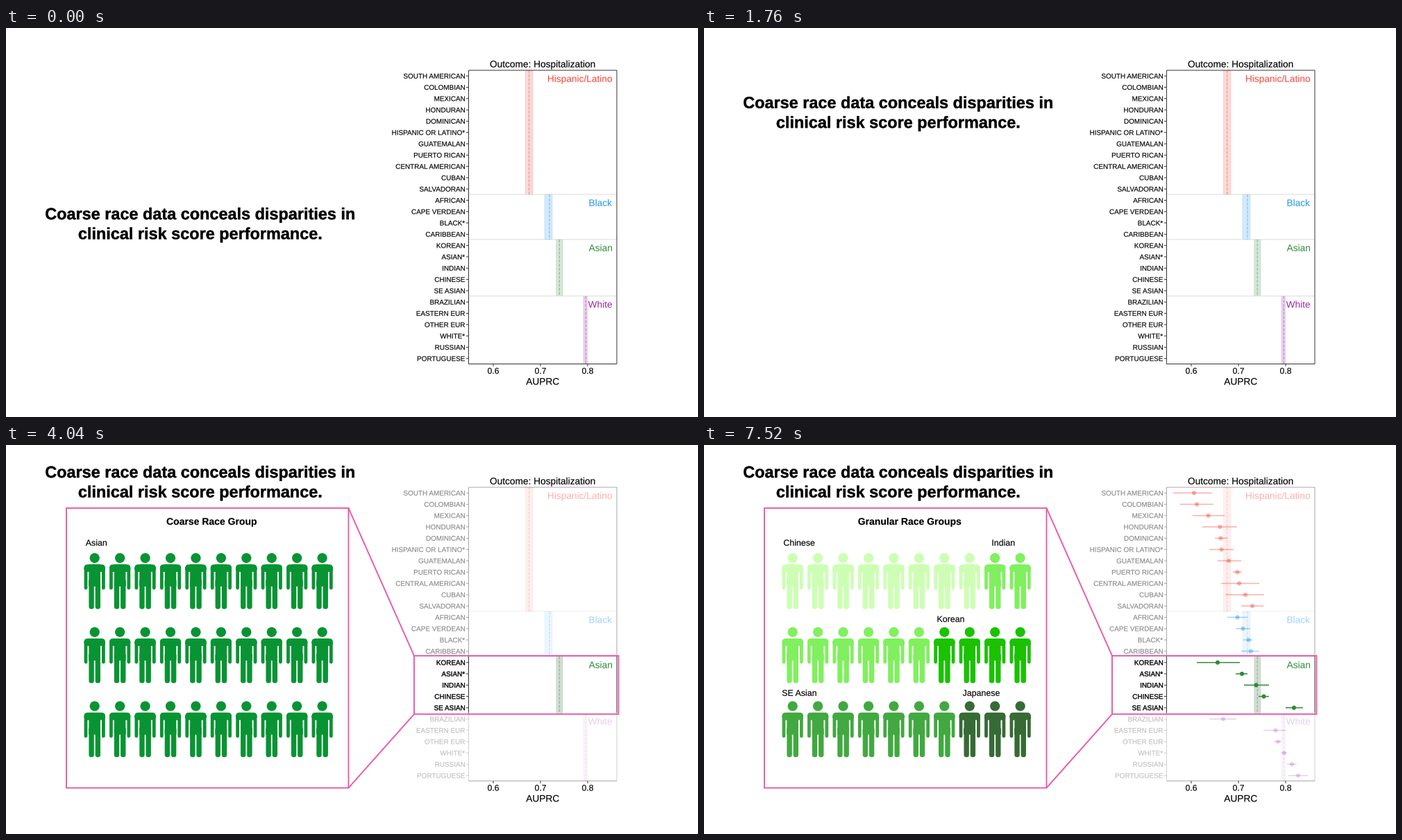
Write a matplotlib script that moves like this. It is 997x561 px and loops after 8 s.

```python
import numpy as np
import matplotlib.pyplot as plt
from matplotlib.animation import FuncAnimation
from matplotlib.colors import to_rgb
from matplotlib.patches import PathPatch
from matplotlib.path import Path
from matplotlib.textpath import TextPath
from matplotlib.transforms import Affine2D

W, H, DPI = 997, 561, 100
STEP, LOOP = 40, 8000
PX = 72 / DPI

PINK = "#ec58a5"
COARSE = np.array(to_rgb("#089433"))
LEFT, RIGHT, TOP, BOTTOM = 666.5, 880, 61, 484.5
ROW0, ROW_STEP = 69.2, 16.3

fig = plt.figure(figsize=((W + 0.01) / DPI, (H + 0.01) / DPI), dpi=DPI, facecolor="white")
ax = fig.add_axes([0, 0, 1, 1])
ax.set_xlim(0, W)
ax.set_ylim(H, 0)
ax.axis("off")


# ---------- drawing helpers ----------
def add(path, fill="none", edge="none", lw=0.0, alpha=1.0, z=1, dash="-"):
    patch = PathPatch(path, facecolor=fill, edgecolor=edge, linewidth=lw * PX,
                      alpha=alpha, zorder=z, linestyle=dash, capstyle="butt",
                      joinstyle="miter", snap=False)
    patch.base = alpha
    return ax.add_patch(patch)


def line(points, color, lw=1.0, **kw):
    return add(Path(points), edge=color, lw=lw, **kw)


def text_path(s, x, base, size, align="left", weight="normal"):
    glyphs = TextPath((0, 0), s, size=size,
                      prop={"family": "Liberation Sans", "weight": weight})
    box = glyphs.get_extents()
    anchor = {"left": box.x0, "center": (box.x0 + box.x1) / 2, "right": box.x1}[align]
    return Affine2D().translate(-anchor, 0).scale(1, -1).translate(x, base).transform_path(glyphs)


def text(s, x, base, size, align="left", weight="normal", color="black", lw=0.15, **kw):
    return add(text_path(s, x, base, size, align, weight), fill=color, edge=color, lw=lw, **kw)


def box_path(x0, y0, x1, y1):
    return Path([(x0, y0), (x1, y0), (x1, y1), (x0, y1), (x0, y0)],
                [Path.MOVETO] + [Path.LINETO] * 3 + [Path.CLOSEPOLY])


def round_box(x0, y0, x1, y1, r):
    pts = [(x0 + r, y0), (x1 - r, y0), (x1, y0), (x1, y0 + r),
           (x1, y1 - r), (x1, y1), (x1 - r, y1), (x0 + r, y1),
           (x0, y1), (x0, y1 - r), (x0, y0 + r), (x0, y0), (x0 + r, y0)]
    codes = [Path.MOVETO] + [Path.LINETO, Path.CURVE3, Path.CURVE3] * 4
    return Path(pts, codes)


def person_path():
    """Standing figure with its head centred on the origin."""
    return Path.make_compound_path(
        Path.circle((0, 0), 7.1),
        round_box(-15.1, 9.3, 15.1, 20, 4.8),
        round_box(-15.1, 12, -10.3, 45.5, 2.4),
        round_box(10.3, 12, 15.1, 45.5, 2.4),
        round_box(-8.3, 9.3, 8.3, 41, 0.5),
        round_box(-8.3, 30, -0.9, 73.6, 3.5),
        round_box(0.9, 30, 8.3, 73.6, 3.5))


# ---------- timing helpers ----------
def ramp(t, start, end):
    return float(np.clip((t - start) / (end - start), 0, 1))


def ease(u):
    """Cubic Bezier ease-in-out (0.42, 0, 0.58, 1)."""
    s = np.linspace(0, 1, 200)
    x = 3 * s * (1 - s) ** 2 * 0.42 + 3 * s ** 2 * (1 - s) * 0.58 + s ** 3
    return float(np.interp(u, x, 3 * s ** 2 - 2 * s ** 3))


def mix(a, b, u):
    return tuple(np.asarray(a) * (1 - u) + np.asarray(b) * u)


def fade(artists, amount):
    for a in artists:
        a.set_alpha(a.base * amount)


# ---------- forest plot ----------
# name, colour, top, bottom, band left, band right, mean line, rows (label, low, mid, high)
GROUPS = [
    ("Hispanic/Latino", "#f44336", TOP, 240, 748.5, 759, 753.7, [
        ("SOUTH AMERICAN", 676, 706, 732), ("COLOMBIAN", 686, 710, 734),
        ("MEXICAN", 704, 726.5, 750), ("HONDURAN", 718, 743.5, 768),
        ("DOMINICAN", 736, 744.5, 754), ("HISPANIC OR LATINO*", 728, 745.5, 763),
        ("GUATEMALAN", 740, 756, 774), ("PUERTO RICAN", 762, 768.5, 775),
        ("CENTRAL AMERICAN", 745, 771, 800), ("CUBAN", 751, 780, 807),
        ("SALVADORAN", 774, 790, 806)]),
    ("Black", "#2196f3", 240, 305, 776, 787, 783, [
        ("AFRICAN", 754, 768.5, 783), ("CAPE VERDEAN", 766, 776.5, 787),
        ("BLACK*", 777, 784.5, 790), ("CARIBBEAN", 774, 788, 800)]),
    ("Asian", "#2e8b38", 305, 386.5, 792.8, 802, 797.3, [
        ("KOREAN", 710, 740, 772), ("ASIAN*", 766, 775, 783),
        ("INDIAN", 778, 795.5, 814), ("CHINESE", 799, 806.5, 814),
        ("SE ASIAN", 838, 850, 863)]),
    ("White", "#9c27b0", 386.5, BOTTOM, 832, 837.5, 835.3, [
        ("BRAZILIAN", 728, 748, 767), ("EASTERN EUR", 806, 823.5, 838),
        ("OTHER EUR", 821, 827, 832), ("WHITE*", 832, 836, 839),
        ("RUSSIAN", 840, 847, 854), ("PORTUGUESE", 842, 856, 870)]),
]


def draw_group(name, color, top, bottom, x0, x1, mean, rows, first):
    frame, dots, labels = [], [], []
    band = add(box_path(x0, top, x1, bottom), fill=color, alpha=0.2)
    frame += [band, add(box_path(x0, top, x1, bottom), edge=color, lw=0.8, alpha=0.2)]
    frame.append(line([(mean, top), (mean, bottom)], mix(to_rgb(color), (0.4, 0.4, 0.4), 0.35),
                      1.1, alpha=0.5, z=2, dash=(0, (3.7, 1.6))))
    if top != TOP:
        frame.append(line([(LEFT, top), (RIGHT, top)], "#dcdcdc"))
    for x in (LEFT, RIGHT):
        frame.append(line([(x, top), (x, bottom)], "#333333", z=3))
    frame.append(text(name, 873, top + 16.8, 13.7, "right", color=color, lw=0, z=3))
    for i, (label, low, mid, high) in enumerate(rows):
        y = ROW0 + ROW_STEP * (first + i)
        labels.append(text(label, 661, y + 3.55, 9.93, "right", z=3))
        frame.append(line([(663, y), (LEFT, y)], "#333333", z=3))
        dots.append(line([(low, y), (high, y)], color, 1.5, z=4))
        dots.append(add(Path.circle((mid, y), 3.1), fill=color, z=4))
    return {"band": band, "frame": frame, "labels": labels, "dots": dots}


plots, first_row = {}, 0
for group in GROUPS:
    plots[group[0]] = draw_group(*group, first_row)
    first_row += len(group[-1])

plots["Hispanic/Latino"]["frame"].append(line([(LEFT, TOP), (RIGHT, TOP)], "#333333", z=3))
plots["Black"]["frame"].append(line([(LEFT, BOTTOM), (RIGHT, BOTTOM)], "#333333", z=3))

text("Outcome: Hospitalization", 773, 56.7, 13.7, "center")
text("AUPRC", 773, 514.4, 13.7, "center")
for i in range(3):
    x = 702 + 68 * i
    line([(x, BOTTOM), (x, BOTTOM + 3.5)], "#333333")
    text(f"0.{6 + i}", x, 498.6, 12.2, "center")

# ---------- headline ----------
headline = add(Path.make_compound_path(
    text_path("Coarse race data conceals disparities in", 279.5, 47, 23.45, "center", "bold"),
    text_path("clinical risk score performance.", 279.5, 75.5, 23.45, "center", "bold")),
    fill="black", edge="black", lw=0.45)

# ---------- call-out panel ----------
callout = [
    add(box_path(87, 91, 493.5, 494.5), edge=PINK, lw=1.9, z=5),
    add(box_path(588, 304, 882.5, 388.2), edge=PINK, lw=1.9, z=5),
    line([(493.5, 91), (588, 304)], PINK, 1.9, z=5),
    line([(493.5, 494.5), (588, 388.2)], PINK, 1.9, z=5),
]

coarse_text = [
    text("Coarse Race Group", 296.3, 115, 13.98, "center", "bold", z=6),
    text("Asian", 114.8, 145.2, 12.4, z=6),
]
fine_text = [text("Granular Race Groups", 296.3, 115, 13.98, "center", "bold", z=6)]
for label, x, base in [("Chinese", 115, 145.2), ("Indian", 415.5, 145.2),
                       ("Korean", 336.5, 255.2), ("SE Asian", 112.8, 361.8),
                       ("Japanese", 372.8, 361.8)]:
    fine_text.append(text(label, x, base, 12.4, z=6))

# colour and head count of each subgroup, filled row by row
SUBGROUPS = [("#ccffb3", 8), ("#80f05e", 8), ("#1ac200", 4), ("#41a940", 7), ("#376b35", 3)]
crowd, figure, place = [], person_path(), 0
for color, count in SUBGROUPS:
    parts = []
    for k in range(place, place + count):
        row, col = divmod(k, 10)
        shift = Affine2D().translate(127.7 + 36.44 * col, 163 + 106.8 * row)
        parts.append(shift.transform_path(figure))
    crowd.append((add(Path.make_compound_path(*parts), fill=COARSE, z=6), to_rgb(color)))
    place += count


# ---------- animation ----------
def update(i):
    t = i * STEP

    rise = ease(ramp(t, 860, 2310))
    headline.set_transform(Affine2D().translate(0, 229 * (1 - rise)) + ax.transData)

    dim = ease(ramp(t, 1700, 2420))
    show = ramp(t, 2930, 4040)
    split = ramp(t, 5440, 7520)
    swap = ramp(t, 5470, 6440)

    level = {"Hispanic/Latino": 1 - 0.58 * dim, "Black": 1 - 0.58 * dim,
             "Asian": 1.0, "White": 1 - 0.78 * dim}
    for name, parts in plots.items():
        fade(parts["frame"] + parts["labels"], level[name])
        fade(parts["dots"], level[name] * split)

    asian = plots["Asian"]
    for label in asian["labels"]:
        label.set_linewidth((0.15 + 0.2 * dim) * PX)
    asian["band"].set_facecolor(mix(to_rgb("#2e8b38"), to_rgb("#1f5c27"), show))

    fade(callout, ramp(t, 2930, 3840))
    fade(coarse_text, show * (1 - swap))
    fade(fine_text, swap)
    for people, color in crowd:
        people.set_facecolor(mix(COARSE, color, split))
        people.set_alpha(show)
    return []


anim = FuncAnimation(fig, update, frames=LOOP // STEP, interval=STEP,
                     init_func=lambda: update(0), repeat=True, repeat_delay=0, blit=False)
plt.show()
```
